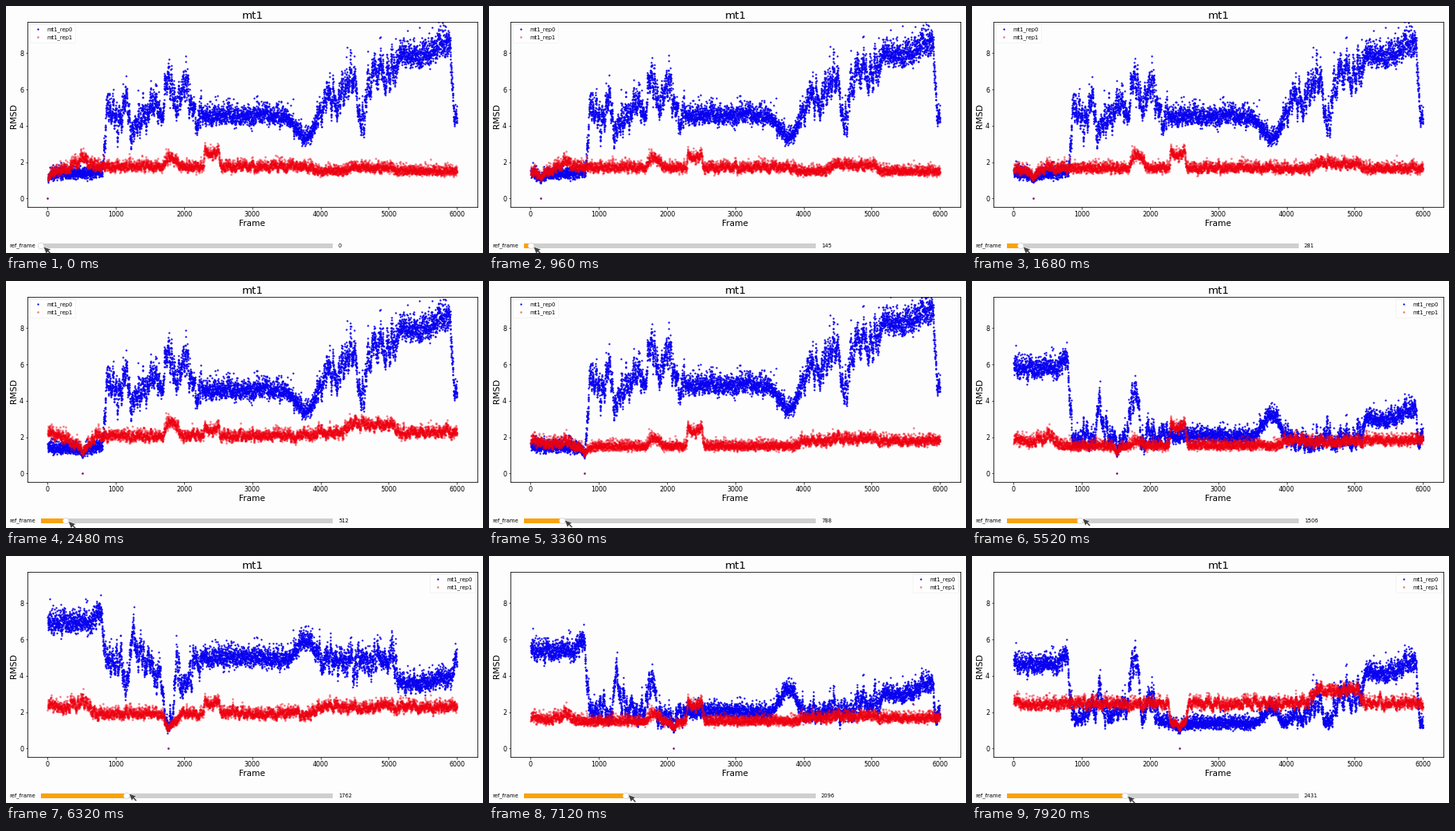
Animation of 600x311 px, one loop 8 s. Source, as a matplotlib script:

```python
import numpy as np
import matplotlib.pyplot as plt
from matplotlib.animation import FuncAnimation
from matplotlib.patches import Circle, Polygon, Rectangle

W, H, DPI = 600, 311, 64
PX = 72 / DPI  # points per pixel
FRAMES, INTERVAL = 100, 80
N = 6000
BLUE, RED = "#0800f0", "#ee0010"

plt.rcParams["font.family"] = "DejaVu Sans"
rng = np.random.default_rng(7)
steps = np.arange(N + 1)

# Slider drag: time in ms, reference reached, pointer height.
DRAG_T = [0, 800, 1680, 2480, 3360, 4640, 6320, 7920]
DRAG_REF = [0, 115, 281, 512, 788, 1225, 1762, 2431]
DRAG_Y = [303, 303, 303, 302.5, 301, 299, 299, 302]


def wander(width):
    """Unit-variance 3D noise that stays correlated over width steps."""
    kernel = np.hanning(width)
    kernel /= np.sqrt((kernel ** 2).sum())
    return np.array([np.convolve(rng.normal(size=N + 1), kernel, "same")
                     for _ in range(3)])


class Trajectory:
    """A molecule moving between shapes, each a point in a 3D shape space."""

    def __init__(self, shapes, visits, floor, drift, noise):
        times = list(visits)
        path = np.array([shapes[name] for name in visits.values()]).T
        self.path = np.array([np.interp(steps, times, axis) for axis in path])
        self.path += wander(30) * drift
        self.floor = floor
        z = rng.normal(size=N + 1)
        self.scatter = z + 0.1 * (z ** 2 - 1)
        self.noise = noise

    def rmsd(self, ref):
        gap = ((self.path - self.path[:, ref, None]) ** 2).sum(axis=0)
        nearby = np.exp(-np.abs(steps - ref) / 50)
        d = np.sqrt(self.floor ** 2 * (1 - 0.5 * nearby) + gap)
        base, slope = self.noise
        d += self.scatter * (base + slope * d) * (1 - 0.4 * nearby)
        d = np.maximum(d, 0.8)
        d[ref] = 0
        return d


active = ((steps > 830) & (steps < 2250)) | ((steps > 3930) & (steps < 5120))

blue = Trajectory(
    shapes=dict(start=(0, 0, 0), lifted=(-0.7, -0.3, 0), mid=(4.2, 0.4, 1),
                side=(5, 1.8, 0.8), bent=(2.4, 0, 2.1), open=(4.4, 4.6, 0),
                swing=(6.2, 2, -1), core=(4.3, 0, 0), dip=(3, -0.7, 0.6),
                far=(6.6, 0.5, 0.4), top=(7.3, 2.6, 0), peak=(8, 3, 0)),
    visits={0: "start", 620: "start", 780: "lifted", 850: "mid", 1080: "mid",
            1130: "side", 1180: "side", 1225: "bent", 1270: "bent",
            1340: "mid", 1500: "mid", 1600: "side", 1650: "mid",
            1720: "open", 1810: "open", 1880: "core", 2020: "swing",
            2110: "core", 3520: "core", 3720: "dip", 3860: "dip",
            3950: "core", 4500: "far", 4560: "core", 4640: "core",
            4700: "far", 5070: "far", 5140: "top", 5500: "top",
            5890: "peak", 5960: "core"},
    floor=1.4, drift=np.where(active, 0.45, 0.12), noise=(0.15, 0.025))

red = Trajectory(
    shapes=dict(start=(0.3, 0.8, 0.3), bump=(0.3, -0.7, 1), mid=(0, 0, 0),
                twist=(0.3, 0, -1), kink=(1.9, 0, 0), tail=(-0.6, 0.9, 0)),
    visits={0: "start", 150: "start", 512: "bump", 700: "mid", 1680: "mid",
            1740: "twist", 1860: "twist", 1960: "mid", 2270: "mid",
            2300: "kink", 2510: "kink", 2560: "mid", 3850: "mid",
            3950: "start", 4300: "start", 4450: "tail", 5050: "tail",
            5150: "start"},
    floor=1.5, drift=0.15, noise=(0.14, 0))


fig = plt.figure(figsize=(W / DPI, H / DPI), dpi=DPI, facecolor="#fefdfe")

ax = fig.add_axes([27 / W, 1 - 253 / H, 566 / W, 233 / H], facecolor="none")
ax.set_xlim(-297, 6303)
ax.set_ylim(-0.4625, 9.7125)
ax.set_xticks(range(0, 6001, 1000))
ax.set_yticks(range(0, 9, 2))
ax.tick_params(length=2.5 * PX, width=0.7 * PX, pad=2.5 * PX, labelsize=8 * PX)
for spine in ax.spines.values():
    spine.set_linewidth(0.8 * PX)

blue_line, = ax.plot([], [], "o", color=BLUE, ms=2.3 * PX, mew=0,
                     label="mt1_rep0")
red_line, = ax.plot([], [], "o", color=RED, ms=2.7 * PX, mew=0, alpha=0.5,
                    label="mt1_rep1")


def make_legend(loc):
    box = ax.legend(loc=loc, fontsize=6.7 * PX, numpoints=1)
    box.get_frame().set(linewidth=0.5 * PX, edgecolor="0.9")
    return box


left_legend = make_legend("upper left")
right_legend = make_legend("upper right")
ax.add_artist(left_legend)

# Overlay in pixel coordinates for labels, slider and pointer.
ui = fig.add_axes([0, 0, 1, 1])
ui.set_xlim(0, W)
ui.set_ylim(H, 0)
ui.axis("off")
ui.text(310, 16.5, "mt1", size=13.4 * PX, ha="center", va="baseline")
ui.text(310, 277, "Frame", size=10.5 * PX, ha="center", va="baseline")
ui.text(9.5, 138, "RMSD", size=10.5 * PX, ha="center", va="center", rotation=90)
ui.text(37.5, 302, "ref_frame", size=6.7 * PX, ha="right", va="center")
value_text = ui.text(418, 302, "", size=6.7 * PX, va="center_baseline")

TRACK_X, TRACK_W = 44, 366.5
ui.add_patch(Rectangle((TRACK_X, 299), TRACK_W, 6, fc="0.81", lw=0))
fill = ui.add_patch(Rectangle((TRACK_X, 299), 0, 6, fc="#f9a208", lw=0))
knob = ui.add_patch(Circle((TRACK_X, 302), 3.7, fc="white", ec="0.8",
                           lw=0.6 * PX, zorder=3))
ARROW = np.array([(0, 0), (10, 3.6), (6.8, 5), (10.2, 8.6), (8.6, 10),
                  (5.4, 6.6), (3.6, 9.4)])
pointer = ui.add_patch(Polygon(ARROW, fc="0.25", ec="white", lw=0.6 * PX,
                               zorder=4))


def update(i):
    t = i * INTERVAL
    ref = int(round(np.interp(t, DRAG_T, DRAG_REF)))
    blue_rmsd = blue.rmsd(ref)
    blue_line.set_data(steps, blue_rmsd)
    red_line.set_data(steps, red.rmsd(ref))

    # The legend moves to the right corner once that corner is free.
    crowded = blue_rmsd[5600:].max() > 8.4
    left_legend.set_visible(crowded)
    right_legend.set_visible(not crowded)

    x = TRACK_X + TRACK_W * ref / N
    fill.set_width(x - TRACK_X)
    knob.center = (x, 302)
    pointer.set_xy(ARROW + (x + 3, np.interp(t, DRAG_T, DRAG_Y)))
    value_text.set_text(str(ref))
    return []


anim = FuncAnimation(fig, update, frames=FRAMES, interval=INTERVAL,
                     init_func=lambda: [], repeat=True, repeat_delay=0,
                     blit=False)
plt.show()
```
